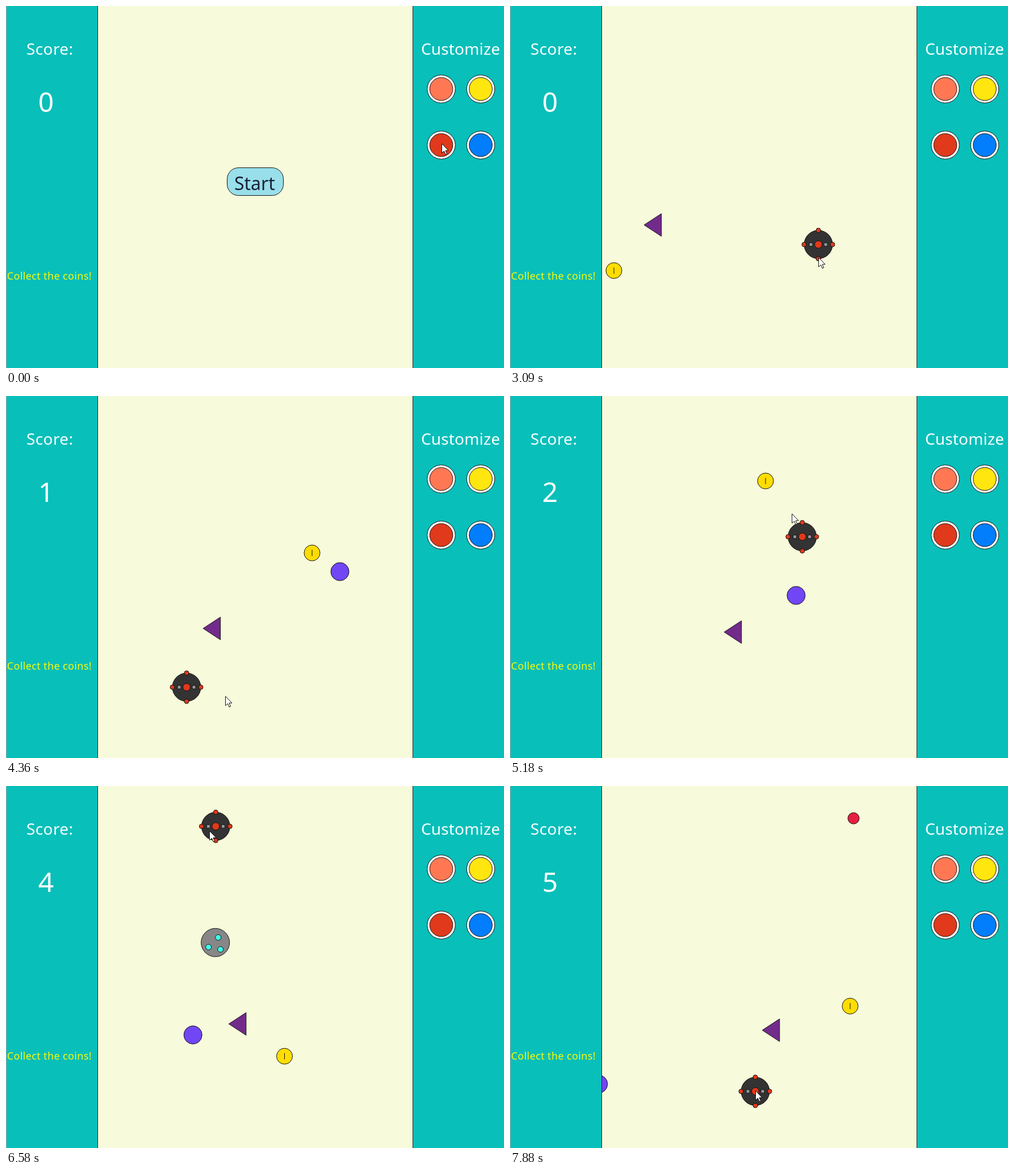
Recreate the animation shown at these times as an HTML page with a canvas. Size 877 px wide and 639 px high, loop 8 s.

```html
<!DOCTYPE html>
<html lang="en">
<head>
<meta charset="utf-8">
<title>Collect the coins</title>
<style>
  html, body { margin: 0; width: 100%; height: 100%; overflow: hidden; }
  canvas { display: block; }
</style>
</head>
<body>
<canvas id="stage" width="877" height="639"></canvas>
<script>
const ctx = document.getElementById('stage').getContext('2d');
const LOOP = 8000, REFRESH = 140, CHASE = 140;
const TEAL = '#08bfba', RED = '#e0391b', INK = '#111', EDGE = '#0e2a2b';

// The player chases the cursor: its velocity is lead / CHASE,
// where lead is how far the cursor is ahead.
const route = [
  { t: 0, at: [767, 243] },
  { t: 310, at: [767, 243] },
  { t: 1260, at: [495, 302] },
  { t: 1950, at: [494, 341] },
  { t: 2240, at: [470, 320] },
  { t: 3090, at: [543, 421], lead: [0, 23] },
  { t: 3500, at: [355, 520], lead: [-75, 10] },
  { t: 3925, at: [202, 480], coin: [539, 277] },
  { t: 4360, at: [318, 514], lead: [68, 16] },
  { t: 4900, at: [525, 295], lead: [0, -50], coin: [450, 150] },
  { t: 5480, at: [428, 140], lead: [-25, -35], coin: [382, 64] },
  { t: 6060, at: [360.5, 65], lead: [28.5, 12] },
  { t: 6196, at: [375, 66], lead: [8, -4], coin: [490.5, 477] },
  { t: 7010, at: [315, 113.5], lead: [-7, 8.5] },
  { t: 7596, at: [465, 460], lead: [15, 50], coin: [599, 388.5] },
  { t: 7880, at: [432, 539], lead: [0, -1] }
];
const START_CLICK = 2240, FIRST_COIN = [183, 467];
const pickups = route.filter(key => key.coin);

// The triangle comes in again every 720 ms, restarted at these moments.
const triangleStarts = [2532, 3931, 6759, 7564];

// The screen refreshes about every 140 ms, in step with the route.
function snap(time) {
  const i = route.findLastIndex(key => key.t <= time);
  const start = route[i].t;
  if (i === route.length - 1) return start;
  const gap = route[i + 1].t - start, step = gap / Math.round(gap / REFRESH);
  return start + step * Math.floor((time - start) / step + 1e-6);
}

// Cubic Hermite curve through the route: player and cursor positions.
function chase(t) {
  const i = Math.min(route.findLastIndex(key => key.t <= t), route.length - 2);
  const a = route[i], b = route[i + 1], span = b.t - a.t, s = (t - a.t) / span;
  const player = [], cursor = [];
  for (const axis of [0, 1]) {
    const p = a.at[axis], d = b.at[axis] - p;
    const u = (a.lead?.[axis] ?? 0) * span / CHASE;
    const v = (b.lead?.[axis] ?? 0) * span / CHASE;
    const c2 = 3 * d - 2 * u - v, c3 = u + v - 2 * d;
    const speed = (u + 2 * c2 * s + 3 * c3 * s * s) / span;
    player[axis] = p + u * s + c2 * s * s + c3 * s ** 3;
    cursor[axis] = player[axis] + (t < START_CLICK ? 0 : speed * CHASE);
  }
  return { player, cursor };
}

function paint(fill) {
  ctx.fillStyle = fill;
  ctx.strokeStyle = INK;
  ctx.fill();
  ctx.stroke();
}

function circle(x, y, r, fill) {
  ctx.beginPath();
  ctx.arc(x, y, r, 0, Math.PI * 2);
  paint(fill);
}

function polygon(points, fill) {
  ctx.beginPath();
  points.forEach(([x, y]) => ctx.lineTo(x, y));
  ctx.closePath();
  paint(fill);
}

function box(x, y, w, h, fill) {
  ctx.fillStyle = fill;
  ctx.fillRect(x, y, w, h);
}

function text(string, x, y, size, fill, spacing = 0, align = 'left') {
  ctx.font = `${size}px "Noto Sans", "Open Sans", sans-serif`;
  ctx.letterSpacing = spacing + 'px';
  ctx.textAlign = align;
  ctx.fillStyle = fill;
  ctx.fillText(string, x, y);
}

function drawStartButton() {
  ctx.beginPath();
  ctx.roundRect(389.5, 285.5, 99, 49, 20);
  paint('#98dfea');
  text('Start', 402, 325, 32, '#1b2138');
}

function drawCoin([x, y]) {
  circle(x, y, 14, '#fd0');
  box(x - 0.5, y - 5.5, 1, 11, INK);
}

function drawEnemies(t) {
  const start = triangleStarts.findLast(s => s <= t);
  if (start) {
    const x = 716 - 0.86 * ((t - start) % 720), y = 386.5 + 0.214 * (x - 236);
    polygon([[x, y], [x + 30.5, y - 20], [x + 30.5, y + 20]], '#722b8b');
  }

  const drift = 0.0614 * (t - 4360);
  circle(588 - 2 * drift, 310 + drift, 16, '#7146f5');

  const rise = 0.241 * (t - 6060), x = 270.5 + rise, y = 374.5 - rise;
  circle(x, y, 25, '#878787');
  for (const [dx, dy] of [[5, -9], [-12, 8], [9, 12]])
    circle(x + dx, y + dy, 5, '#42fbec');

  circle(700 - 0.1092 * (t - 7010), 57, 10, '#e61f41');
}

function drawPlayer([x, y]) {
  circle(x, y, 25, '#333');
  circle(x, y, 6.5, RED);
  for (const side of [-1, 1]) {
    circle(x + side * 25, y, 4, RED);
    circle(x, y + side * 25, 4, RED);
    ctx.beginPath();
    ctx.rect(x + side * 13 - 3, y - 3, 6, 6);
    paint('#999');
  }
}

function drawPanels(score) {
  box(0, 0, 161, 639, TEAL);
  box(0, 0, 1, 639, '#96a5a5');
  box(161, 0, 1, 639, EDGE);
  box(717, 0, 160, 639, TEAL);
  box(716, 0, 1, 639, EDGE);
  text('Score:', 36, 86, 28, '#fff', 0.4);
  text('Customize', 731, 86, 28, '#fff', 0.15);
  text('Collect the coins!', 1.8, 483, 18, '#f8fa08', 0.35);
  text(score, 70.5, 186.5, 48, '#fff', 0, 'center');
  ['#ff7853', '#ffe60f', RED, '#027dfb'].forEach((color, i) => {
    const x = i % 2 ? 836 : 766.5, y = i < 2 ? 146.5 : 245.5;
    circle(x, y, 24.7, '#fff');
    circle(x, y, 20.3, color);
  });
}

function drawCursor([x, y]) {
  const outline = [[0, 0], [0, 16.5], [4, 13], [6.5, 19], [9, 18], [6.5, 12], [11.5, 12]];
  polygon(outline.map(([dx, dy]) => [x + 0.5 + dx, y + dy]), '#fff');
}

function render(t) {
  const { player, cursor } = chase(t);
  const collected = pickups.filter(key => key.t <= t);
  const playing = t >= START_CLICK;
  box(0, 0, 877, 639, '#f7fadb');
  if (playing) {
    drawCoin(collected.at(-1)?.coin ?? FIRST_COIN);
    drawEnemies(t);
  } else drawStartButton();
  drawPanels(collected.length);
  if (playing) drawPlayer(player);
  drawCursor(cursor);
}

const began = performance.now();
function tick() {
  render(snap((performance.now() - began) % LOOP));
  requestAnimationFrame(tick);
}
tick();
</script>
</body>
</html>
```
